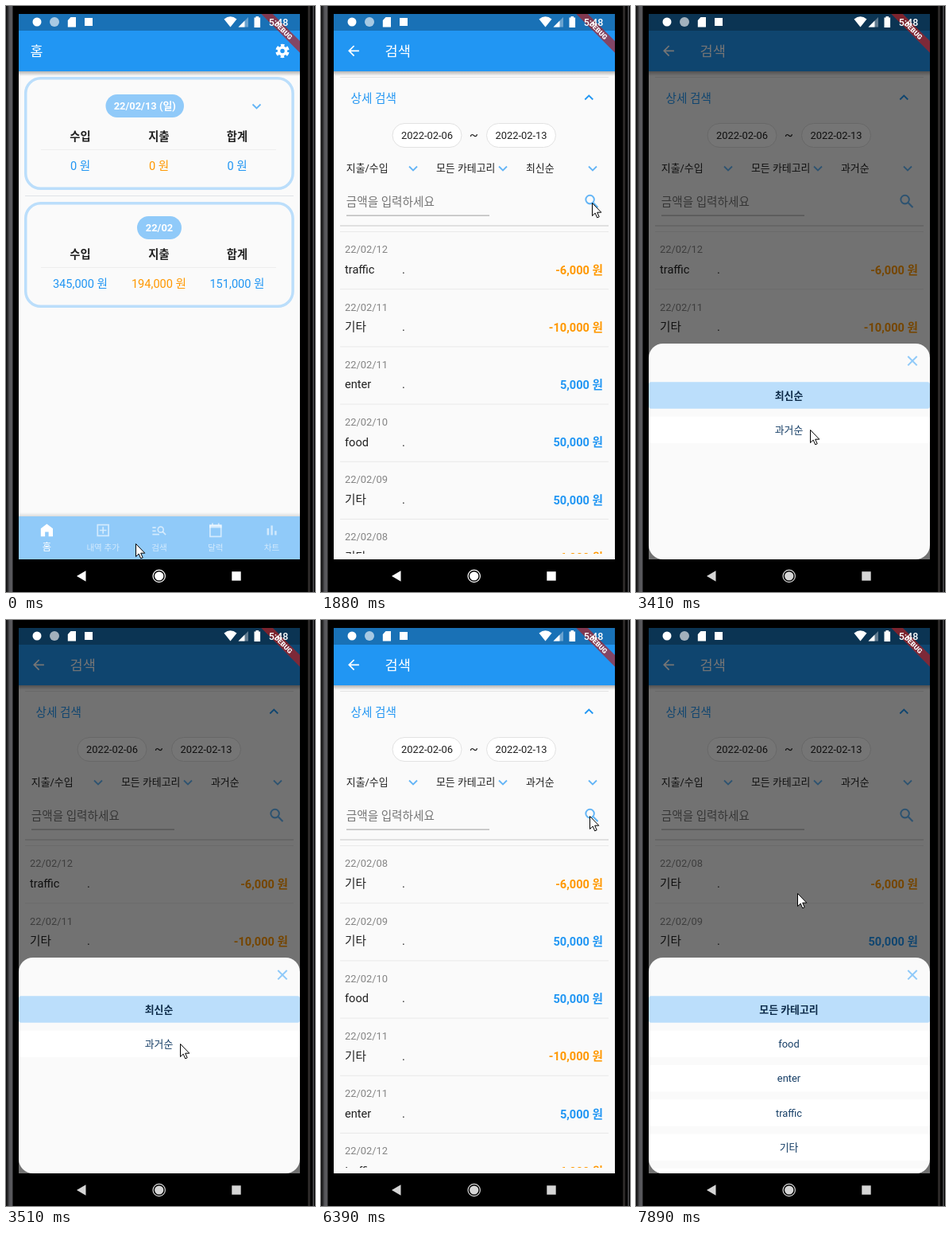
An HTML page for the animation above (8 s loop, 389x736 px).

```html
<!DOCTYPE html>
<html lang="ko">
<head>
<meta charset="utf-8">
<title>Budget app</title>
<style>
html, body { margin: 0; width: 100%; height: 100%; overflow: hidden; background: #000; }
svg { display: block; width: 389px; height: 736px; }
text { font-family: Roboto, 'Noto Sans CJK KR', 'Noto Sans CJK', sans-serif; white-space: pre; }
</style>
</head>
<body>
<svg id="stage" viewBox="0 0 389 736" xmlns="http://www.w3.org/2000/svg"></svg>
<script>
const BLUE = '#2196f3', ORANGE = '#ff9800', SOFT = '#64b5f6', PALE = '#90caf9', ICE = '#bbdefb', INK = '#212121';
const LOOP = 8000, SHEET_TOP = 424, SHEET_H = 271;

// Drawing helpers
const rect = (x, y, w, h, fill, rx = 0, more = '') =>
  `<rect x="${x}" y="${y}" width="${w}" height="${h}" rx="${rx}" fill="${fill}" ${more}/>`;
const text = (s, x, y, size, fill, weight = 400, anchor = 'start', more = '') =>
  `<text x="${x}" y="${y}" font-size="${size}" fill="${fill}" font-weight="${weight}" text-anchor="${anchor}" ${more}>${s}</text>`;
const line = (x1, x2, y, color, w = 1) => rect(x1, y - w / 2, x2 - x1, w, color);
const path = (d, color, w = 2) => `<path d="${d}" fill="none" stroke="${color}" stroke-width="${w}"/>`;
const solid = (d, color) => `<path d="${d}" fill="${color}"/>`;
const ring = (x, y, r, color, w = 2, more = '') =>
  `<circle cx="${x}" cy="${y}" r="${r}" fill="none" stroke="${color}" stroke-width="${w}" ${more}/>`;
const dot = (x, y, r, fill, more = '') => `<circle cx="${x}" cy="${y}" r="${r}" fill="${fill}" ${more}/>`;
const icon = (body, x, y, size = 20.7) =>
  `<g transform="translate(${x - size / 2} ${y - size / 2}) scale(${size / 24})">${body}</g>`;
const chevron = (x, y, dir, color) =>
  path(`M${x - 5} ${y - 2.5 * dir}L${x} ${y + 2.5 * dir}L${x + 5} ${y - 2.5 * dir}`, color, 1.8);

const page = () => rect(16, 10, 354, 685, '#fafafa');
const appBar = () => rect(16, 82, 354, 6, 'url(#shade)') + rect(16, 10, 354, 72, BLUE);

function card(top, height, label, pillX, pillW, pillY, amounts) {
  const cols = [93.5, 192.5, 291], heads = ['수입', '지출', '합계'];
  let s = rect(24.7, top + 1.7, 336.4, height - 3.4, 'none', 19, `stroke="${ICE}" stroke-width="3.5"`);
  s += rect(pillX, pillY, pillW, 29, PALE, 14.5);
  s += text(label, pillX + pillW / 2, pillY + 19.3, 12.9, '#fff', 700, 'middle');
  const base = top + height;
  s += line(44, 340, base - 50.5, '#eee');
  cols.forEach((x, i) => {
    s += text(heads[i], x, base - 61.7, 14.3, INK, 700, 'middle');
    s += text(amounts[i] + ' 원', x, base - 25.5, 14.6, i === 1 ? ORANGE : BLUE, 400, 'middle');
  });
  return s;
}

function tabBar() {
  const dim = 'rgba(255,255,255,.6)';
  const tabs = [
    ['홈', solid('M12 2.6L3.2 9.4V21H9.4v-6.6h5.2V21h6.2V9.4z', '#fff')],
    ['내역 추가', path('M4 4h16v16H4zM12 7v10M7 12h10', dim)],
    ['검색', path('M2 8h5M2 13h5M2 18h10M16.8 13.8l4.6 4.6', dim) + ring(14, 11, 4, dim)],
    ['달력', path('M4 5h16v16H4z', dim) + solid('M3 4h18v4.5H3zM6.5 1.5h2V4h-2zM15.5 1.5h2V4h-2z', dim)],
    ['차트', solid('M5 9.2h3V19H5zM10.6 5h2.8v14h-2.8zM16.2 13H19v6h-2.8z', dim)]
  ];
  let s = rect(16, 636, 354, 5, 'url(#shadeUp)') + rect(16, 641, 354, 54, PALE);
  tabs.forEach(([name, body], i) => {
    const x = 51.4 + i * 70.8;
    s += icon(body, x, 658.5);
    s += text(name, x, 683.5, i ? 10.6 : 12.2, i ? dim : '#fff', 400, 'middle');
  });
  return s;
}

function homePage() {
  const gear = ring(12, 12, 5.2, '#fff', 4) +
    ring(12, 12, 8.4, '#fff', 3.4, 'stroke-dasharray="5.2 3.6" stroke-dashoffset="-1.8"');
  return page() + appBar() + text('홈', 30.5, 63, 17.4, '#fff', 500) + icon(gear, 348, 56.5, 20.7) +
    card(89, 142, '22/02/13 (일)', 125.5, 98.5, 111, ['0', '0', '0']) +
    chevron(315.5, 126, 1, SOFT) + line(24, 362, 238.5, '#dfe3e8') +
    card(246, 133, '22/02', 165, 56, 264, ['345,000', '194,000', '151,000']) +
    tabBar() + dot(192.5, 668, 1, '#fff', 'id="tabSplash" clip-path="url(#tabs)"');
}

const records = [
  ['12', 'traffic', -6], ['11', '기타', -10], ['11', 'enter', 5],
  ['10', 'food', 50], ['09', '기타', 50], ['08', '기타', -6]
];
const oldestFirst = [5, 4, 3, 1, 2, 0].map(i => records[i]);

const list = rows => rows.map(([day, name, k], i) => {
  const y = 283.5 + i * 72.2;
  return line(24, 362, y, '#e9e9e9') +
    text('22/02/' + day, 30, y + 26.8, 12.9, '#858585') +
    text(name, 30, y + 52.4, 14.6, INK) + text('.', 102, y + 52.4, 14.6, INK) +
    text(k + ',000 원', 355, y + 53.2, 14.6, k < 0 ? ORANGE : BLUE, 700, 'end');
}).join('');

function searchPage() {
  const back = solid('M20 11H7.83l5.59-5.59L12 4l-8 8 8 8 1.41-1.41L7.83 13H20z', '#fff');
  const glass = ring(9.5, 9.5, 5.5, SOFT, 2.1) + path('M13.6 13.6L19.8 19.8', SOFT, 2.3);
  const pill = (x, s) => rect(x, 147.5, 87, 30, '#fff', 15, 'stroke="#e2e2e2"') +
    text(s, x + 43.5, 167, 12.9, INK, 400, 'middle');
  const pick = (x, s, id) => text(s, x, 208.3, 12.9, INK, 400, 'start', `id="${id}"`);
  return page() + appBar() + icon(back, 41, 56.3) + text('검색', 80.5, 63, 17.6, '#fff', 500) +
    line(24, 362, 89.5, '#e4e4e4') + text('상세 검색', 37.5, 121, 14.6, BLUE) + chevron(337.3, 115, -1, BLUE) +
    pill(90, '2022-02-06') + text('~', 192.3, 168, 16.5, INK, 400, 'middle') + pill(208.5, '2022-02-13') +
    rect(249, 193, 113, 22, '#000', 2, 'id="sortInk"') + rect(136, 193, 113, 22, '#000', 2, 'id="kindInk"') +
    pick(31.8, '지출/수입', 'flow') + pick(145, '모든 카테고리', 'kind') + pick(258, '최신순', 'sort') +
    [116, 229, 342].map(x => chevron(x, 204, 1, SOFT)).join('') +
    text('금액을 입력하세요', 31.8, 251, 14.6, '#757575') + line(32, 212, 263.2, '#bdbdbd', 1.5) +
    dot(340.5, 245, 18, '#000', 'id="findInk"') + icon(glass, 341, 245.5, 23) +
    line(24, 362, 276, '#dadada', 1.6) +
    `<g clip-path="url(#rows)"><g id="newest">${list(records)}</g><g id="oldest">${list(oldestFirst)}</g></g>`;
}

const options = (id, names) => `<g id="${id}">` + names.map((name, i) => {
  const y = SHEET_TOP + 48.3 + i * 43.3;
  return rect(16, y, 354, 33.5, i ? '#fff' : ICE, 3) +
    text(name, 192.5, y + 21.4, 12.9, i ? '#173f67' : '#0d2b49', i ? 400 : 700, 'middle');
}).join('') + '</g>';

function sheet() {
  return `<g id="sheet"><g clip-path="url(#sheetShape)">` + rect(16, SHEET_TOP, 354, SHEET_H, '#fafafa') +
    path('M342.3 440L353.7 451.4M353.7 440L342.3 451.4', PALE, 2) +
    options('sortOptions', ['최신순', '과거순']) +
    options('kindOptions', ['모든 카테고리', 'food', 'enter', 'traffic', '기타', '']) + '</g></g>';
}

function banner() {
  return `<g clip-path="url(#screen)"><g transform="translate(370 10) rotate(45)">` +
    rect(-36, 24.1, 72, 10.3, '#b71c1c', 0, 'opacity=".66"') +
    text('DEBUG', 0, 32.4, 8.6, '#fff', 900, 'middle') + '</g></g>';
}

function statusIcons() {
  return dot(39, 20, 5.5, '#fff') + dot(61, 20, 6, 'rgba(255,255,255,.62)') +
    solid('M81.5 14H88v12.5H77.8v-8.6z', '#fff') + rect(99, 15, 10, 10, '#fff') +
    solid('M274.5 16.6Q282.5 10 290.5 16.6L282.5 26.5z', '#fff') +
    solid('M305 14v12.5h-12.5z', 'rgba(255,255,255,.35)') + solid('M300.5 18.5v8h-8z', '#fff') +
    solid('M314.5 13h3.6v1.6h2V27h-7.6V14.6h2z', '#fff') + text('5:48', 330.7, 24.8, 12.5, '#fff', 500);
}

function shell() {
  return rect(0, 0, 389, 10, '#000') + rect(0, 0, 16, 736, '#000') + rect(370, 0, 19, 736, '#000') +
    rect(0, 695, 389, 41, '#000') +
    rect(0, 0, 2, 736, '#161617') + rect(2, 0, 2, 736, '#3a3a3d') + rect(4, 0, 4, 736, '#58585c') +
    rect(8, 0, 1, 736, '#262628') + rect(380, 0, 3, 736, '#2b2827') + rect(386, 0, 2, 736, '#3f3f42') +
    '<g id="keys" fill="#fff" stroke="#fff"><path stroke="none" d="M89 716L100.5 709.3V722.7z"/>' +
    '<circle cx="192.7" cy="716" r="5.6" stroke="none"/><circle cx="192.7" cy="716" r="7.7" fill="none" stroke-width="1.2"/>' +
    '<rect x="284.3" y="710.3" width="11.4" height="11.4" stroke="none"/></g>';
}

const clip = (id, x, y, w, h, rx = 0) => `<clipPath id="${id}">${rect(x, y, w, h, '#000', rx)}</clipPath>`;
const fade = (id, from, to) => `<linearGradient id="${id}" x1="0" x2="0" y1="0" y2="1">` +
  `<stop offset="0" stop-opacity="${from}"/><stop offset="1" stop-opacity="${to}"/></linearGradient>`;

document.getElementById('stage').innerHTML =
  '<defs>' + clip('screen', 16, 10, 354, 685) + clip('rows', 16, 280, 354, 408) + clip('tabs', 16, 641, 354, 54) +
  clip('sheetShape', 16, SHEET_TOP, 354, SHEET_H, 18) + fade('shade', .28, 0) + fade('shadeUp', 0, .12) + '</defs>' +
  `<g clip-path="url(#screen)">${homePage()}<g id="search">${searchPage()}</g>` +
  rect(16, 10, 354, 21, '#000', 0, 'opacity=".25"') + rect(16, 10, 354, 685, '#000', 0, 'id="dim"') + sheet() + '</g>' +
  banner() + shell() + statusIcons() +
  '<path id="cursor" d="M.5.5V16.6L4.2 13.1L6.7 18.9L9.2 17.8L6.7 12.2H11.8Z" fill="#fff" stroke="#000" stroke-width="1"/>';

// Picture changes: [first, last, count]
const bursts = [[0, 0, 1], [130, 880, 7], [1010, 1260, 3], [1410, 2130, 7], [2260, 3010, 7], [3260, 3260, 1],
  [3410, 4140, 7], [4270, 4270, 1], [4770, 5150, 4], [6390, 6890, 5], [7400, 7640, 3], [7890, 7890, 1]];
const ticks = bursts.flatMap(([a, b, n]) =>
  Array.from({ length: n }, (_, i) => Math.floor(a + (n > 1 ? (b - a) * i / (n - 1) : 0))));

// Keyframes: [time, value, ...]
const pointer = [[255, 163, 675], [380, 180, 620], [505, 222, 410], [630, 249, 243], [755, 238, 198], [880, 223, 165],
  [1010, 250, 182], [1135, 296, 204], [1260, 321, 218], [1410, 338, 240], [1530, 341, 247], [1770, 341, 247],
  [2010, 303, 212], [2385, 303, 212], [2635, 268, 360], [2885, 220, 505], [3010, 216, 521], [3135, 216, 521],
  [3260, 219, 532], [3531, 219, 532], [3775, 285, 360], [4018, 341, 253], [4140, 341, 251], [4270, 341, 248],
  [6260, 341, 248], [6390, 338, 246], [6640, 275, 225], [6890, 211, 207], [7640, 211, 207], [7890, 203, 343]];
const lift = [[2130, 0], [2260, .35], [2385, .823], [2510, 1], [3531, 1], [3653, .5], [3775, .08], [3896, 0],
  [7280, 0], [7400, .35], [7520, .85], [7640, 1]];
const shadeTrack = [[2010, 0], [2130, .04], [2260, .2], [2385, .42], [2510, .54], [3531, .54], [3653, .3], [3775, .06],
  [3896, 0], [7280, 0], [7400, .2], [7520, .43], [7640, .54]];

function at(keys, t) {
  const i = keys.findIndex(k => k[0] > t);
  if (i === 0) return keys[0].slice(1);
  if (i < 0) return keys[keys.length - 1].slice(1);
  const a = keys[i - 1], b = keys[i], p = (t - a[0]) / (b[0] - a[0]);
  return a.slice(1).map((v, j) => v + (b[j + 1] - v) * p);
}

const clamp = v => Math.min(1, Math.max(0, v));
const within = (t, a, b) => t >= a && t < b;
const $ = id => document.getElementById(id);
const set = (id, attrs) => { for (const k in attrs) $(id).setAttribute(k, attrs[k]); };
const show = (id, on) => set(id, { display: on ? 'inline' : 'none' });

function draw(time) {
  const t = ticks.reduce((last, x) => x <= time ? x : last, 0);

  const enter = clamp((t - 230) / 300), rise = 171 * Math.pow(1 - enter, 3);
  set('search', { opacity: enter * enter, transform: `translate(0 ${rise})` });
  set('tabSplash', { r: 12 + 40 * clamp((t - 130) / 250), opacity: within(t, 130, 600) ? .2 : 0 });

  show('newest', within(t, 1650, 4890));
  show('oldest', t >= 4890);
  $('sort').textContent = t < 3410 ? '최신순' : '과거순';

  set('sortInk', { opacity: within(t, 2130, 2500) ? .1 : 0 });
  set('kindInk', { opacity: within(t, 7400, 7600) ? .1 : 0 });
  set('findInk', { opacity: within(t, 1530, 1750) || within(t, 4770, 5000) ? .07 : 0 });

  set('dim', { opacity: at(shadeTrack, t)[0] });
  set('sheet', { transform: `translate(0 ${SHEET_H * (1 - at(lift, t)[0])})` });
  show('sortOptions', t < 6000);
  show('kindOptions', t >= 6000);

  const key = t < 2130 ? '#fff' : '#d6d6d6';
  set('keys', { fill: key, stroke: key });
  set('cursor', { transform: `translate(${at(pointer, t).map(Math.round).join(' ')})` });
}

const start = performance.now();
function loop() {
  draw((performance.now() - start) % LOOP);
  requestAnimationFrame(loop);
}
loop();
</script>
</body>
</html>
```
